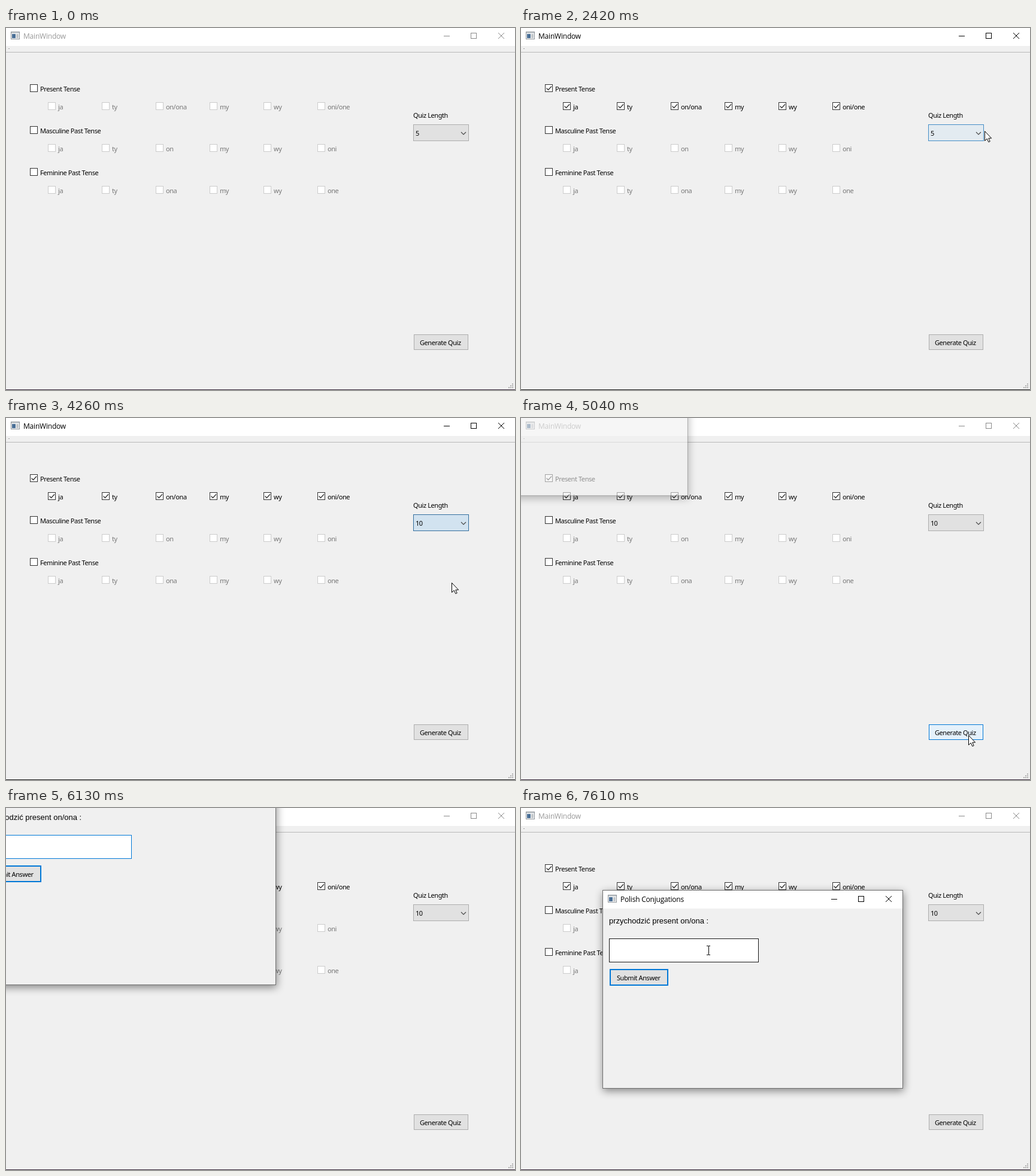
An HTML page that plays this animation: 850 px wide and 605 px high, repeating every 8000 ms.

```html
<!DOCTYPE html>
<html lang="en">
<head>
<meta charset="utf-8">
<title>Quiz setup</title>
<style>
  html, body { margin: 0; width: 100%; height: 100%; overflow: hidden; background: #f0f0f0; }
  svg { display: block; }
  text { white-space: pre; }
  .ui { font: 11px "Noto Sans", "Open Sans", sans-serif; letter-spacing: -.42px; }
  .title { font: 12px "Open Sans", "Noto Sans", sans-serif; letter-spacing: -.22px; }
  .prompt { font: 13px "Liberation Sans", Arial, sans-serif; }
  .shadow { filter: drop-shadow(1px 4px 7px rgba(0, 0, 0, .45)); }
</style>
</head>
<body>
<svg id="stage" width="850" height="605" viewBox="0 0 850 605"></svg>
<script>
const LOOP = 8000;
const stage = document.getElementById('stage');

// Control colours as [fill, border]
const NORMAL = [[225, 225, 225], [173, 173, 173]];
const HOVER = [[229, 241, 251], [0, 120, 215]];
const PRESS = [[204, 228, 247], [0, 84, 153]];

const groups = [
  ['Present Tense', ['ja', 'ty', 'on/ona', 'my', 'wy', 'oni/one']],
  ['Masculine Past Tense', ['ja', 'ty', 'on', 'my', 'wy', 'oni']],
  ['Feminine Past Tense', ['ja', 'ty', 'ona', 'my', 'wy', 'one']],
];

// Moves: [start, end, steps, x, y], each from where the last one ended
const pointerStart = [752, 606];
const pointerMoves = [
  [190, 960, 11, 47, 101],
  [1500, 2260, 11, 755, 197],
  [2340, 2420, 2, 774, 172],
  [2500, 2800, 5, 768, 173],
  [3200, 3500, 5, 748, 208],
  [3650, 3880, 4, 745, 265],
  [4030, 4260, 4, 744, 275],
  [4340, 4800, 7, 747, 530],
  [5120, 5500, 6, 60, -40],
  [6130, 6130, 1, 212, -20],
  [6200, 6280, 2, 401, 157],
  [6430, 6660, 4, 399, 157],
  [6980, 7290, 5, 307, 236],
  [7440, 7440, 1, 311, 238],
  [7610, 7610, 1, 313, 238],
];
const dialogStart = [-212, -193];
const dialogMoves = [
  [5960, 6130, 3, -50, -34],
  [6200, 6280, 2, 139, 139],
  [6430, 6660, 4, 137, 139],
];

const clamp = v => Math.max(0, Math.min(1, v));
const ramp = (t, a, b) => clamp((t - a) / (b - a));
const within = (t, a, b) => t >= a && t < b;

function follow([x, y], moves, t) {
  for (const [t0, t1, n, toX, toY] of moves) {
    if (t < t0) break;
    const p = t >= t1 ? 1 : (Math.floor((t - t0) / (t1 - t0) * (n - 1)) + 1) / n;
    const e = p * p * (3 - 2 * p);
    x += (toX - x) * e;
    y += (toY - y) * e;
  }
  return [Math.round(x), Math.round(y)];
}

const mix = (a, b, p) => a.map((c, i) => c.map((v, j) => v + (b[i][j] - v) * p));
const rgb = c => `rgb(${c.map(Math.round)})`;

const fillRect = (x, y, w, h, fill) =>
  `<rect x="${x}" y="${y}" width="${w}" height="${h}" fill="${fill}"/>`;
const box = (x, y, w, h, fill, line, lw = 1, cls = '') =>
  `<rect class="${cls}" x="${x + lw / 2}" y="${y + lw / 2}" width="${w - lw}" height="${h - lw}" fill="${fill}" stroke="${line}" stroke-width="${lw}"/>`;
const label = (x, y, s, fill = '#000', cls = 'ui') =>
  `<text class="${cls}" x="${x}" y="${y}" fill="${fill}">${s}</text>`;
const stroke = (d, color, w = 1) =>
  `<path d="${d}" fill="none" stroke="${color}" stroke-width="${w}"/>`;
const control = (x, y, w, h, [fill, line]) => box(x, y, w, h, rgb(fill), rgb(line));

function titleBar(w, name, active) {
  const ink = active ? '#000' : '#999';
  const glyph = active ? '#000' : '#8a8a8a';
  return box(8, 6, 15, 13, '#fafafa', '#8e9499')
    + fillRect(9, 7, 13, 2, '#c9ced2')
    + fillRect(10, 10, 6, 7, '#4a6f96')
    + fillRect(17, 10, 4, 7, '#c4c8cb')
    + label(29, 18, name, ink, 'title')
    + stroke(`M${w - 119} 13.5h10`, glyph)
    + box(w - 74, 8, 10, 10, 'none', glyph)
    + stroke(`M${w - 28} 8l10 10m0 -10l-10 10`, glyph);
}

function checkBox(x, y, text, { on, enabled = true, fill = '#fff', line }) {
  return box(x, y, 13, 13, fill, line || (enabled ? '#333' : '#ccc'))
    + (on ? stroke(`M${x + 2.5} ${y + 6.5}l3 3l5.5 -6`, '#333', 1.3) : '')
    + label(x + 17, y + 12, text, enabled ? '#000' : '#787878');
}

function tenseGroups(t) {
  const on = t >= 1190;
  let first = {};
  if (within(t, 1110, 1190)) first = { fill: rgb(PRESS[0]), line: rgb(PRESS[1]) };
  else if (within(t, 900, 1580)) first = { line: rgb(HOVER[1]) };
  return groups.map(([name, forms], g) => {
    const y = 94 + 70 * g, picked = g === 0 && on;
    return checkBox(40, y, name, { on: picked, ...(g ? {} : first) })
      + forms.map((f, i) =>
        checkBox(70 + 90 * i, y + 30, f, { on: picked, enabled: picked })).join('');
  }).join('');
}

function combo(t) {
  let look = mix(NORMAL, HOVER, ramp(t, 2300, 2500));
  if (t >= 2880) look = mix(PRESS, NORMAL, ramp(t, 4030, 4800));
  return label(680, 150, 'Quiz Length')
    + control(680, 161, 93, 28, look)
    + label(684, 180, t < 3640 ? '5' : '10')
    + stroke('M760 174l4 4l4 -4', '#444', 1.1);
}

function comboList(t, y) {
  if (!within(t, 2880, 3640)) return '';
  const picked = Math.max(0, Math.min(3, Math.floor((y - 189) / 13)));
  return box(680, 188, 93, 54, '#fff', '#646464')
    + fillRect(681, 189 + 13 * picked, 91, 13, '#0078d7')
    + [5, 10, 15, 20].map((n, i) =>
      label(684, 200 + 13 * i, n, i === picked ? '#fff' : '#000')).join('');
}

function button(t) {
  let look = mix(NORMAL, HOVER, ramp(t, 4680, 4800) - ramp(t, 5150, 5350));
  if (within(t, 4880, 4960)) look = PRESS;
  return control(681, 512, 91, 26, look) + label(691, 530, 'Generate Quiz');
}

function grip() {
  let dots = '';
  for (let r = 0; r < 3; r++)
    for (let c = 2 - r; c < 3; c++)
      dots += fillRect(839 + 3 * c, 594 + 3 * r, 2, 2, '#b0b0b0');
  return dots;
}

function mainWindow(t) {
  const active = within(t, 1110, 4960);
  return fillRect(0, 0, 850, 605, '#f0f0f0')
    + fillRect(0, 0, 850, 30, '#fff')
    + titleBar(850, 'MainWindow', active)
    + fillRect(4, 34, 2, 1, '#a0a0a0')
    + fillRect(0, 40, 850, 1, '#b8b8b8')
    + tenseGroups(t) + combo(t) + button(t) + grip()
    + fillRect(0, 604, 850, 1, active ? '#1c1c1c' : '#38283a');
}

function dialog(t, inEntry) {
  const shown = ramp(t, 4880, 5150);
  if (t < 4960) return '';
  const [x, y] = follow(dialogStart, dialogMoves, t);
  const scale = .9 + .1 * shown;
  const place = `translate(${x + 250} ${y + 164}) scale(${scale}) translate(-250 -164)`;
  return `<g transform="${place}" opacity="${shown}">`
    + box(-1, -2, 502, 332, '#f0f0f0', '#6e6e6e', 1, 'shadow')
    + fillRect(0, -1, 500, 30, '#fff')
    + titleBar(500, 'Polish Conjugations', true)
    + label(10, 54, 'przychodzić present on/ona :', '#000', 'prompt')
    + box(10, 79, 250, 40, '#fff', inEntry ? '#171717' : '#0078d7')
    + (within(t, 7060, 7610) ? fillRect(13, 90, 1, 18, '#000') : '')
    + box(11, 130, 98, 28, '#e1e1e1', '#0078d7', 2)
    + label(23, 149, 'Submit Answer')
    + '</g>';
}

function pointer(x, y, beam) {
  const shape = beam
    ? stroke('M-3 -7.5h2.5l.5 .5l.5 -.5h2.5M.5 -7V7M-3 7.5h2.5l.5 -.5l.5 .5h2.5', '#000')
    : '<path d="M.5 .5V16.5L4.2 13L6.8 18.6L9.2 17.6L6.8 12.2H11.6Z" fill="#fff" stroke="#000"/>';
  return `<g transform="translate(${x} ${y})">${shape}</g>`;
}

function draw() {
  const t = performance.now() % LOOP;
  const [x, y] = follow(pointerStart, pointerMoves, t);
  const inEntry = t >= 6980 && within(x, 147, 397) && within(y, 218, 258);
  stage.innerHTML = mainWindow(t) + comboList(t, y) + dialog(t, inEntry) + pointer(x, y, inEntry);
  requestAnimationFrame(draw);
}
draw();
</script>
</body>
</html>
```
